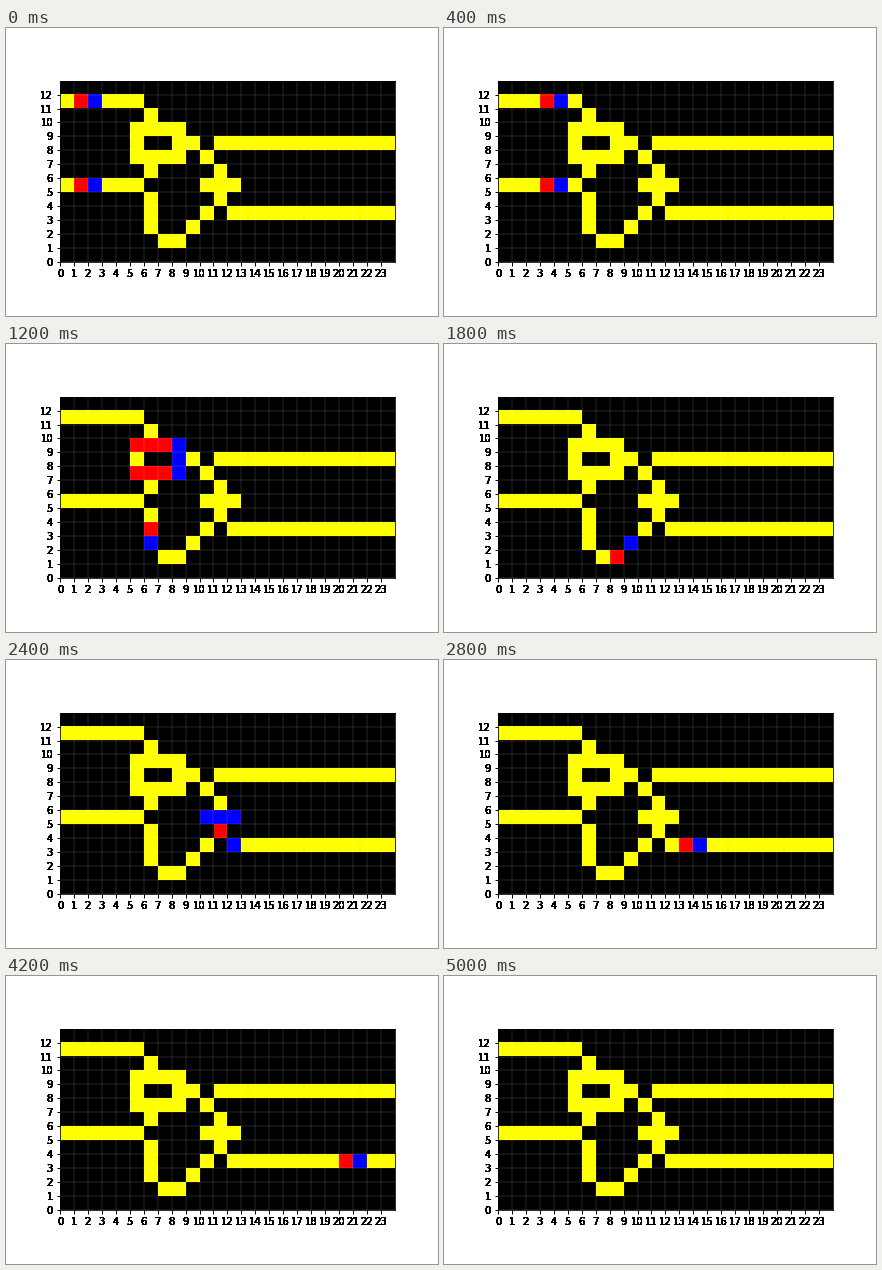
Recreate the animation shown at these times as a matplotlib script. Size 432x288 px, loop 8000 ms.

```python
import numpy as np
import matplotlib.pyplot as plt
from matplotlib.animation import FuncAnimation
from matplotlib.colors import ListedColormap

# Wireworld: two signals run into a logic gate
COLS, ROWS = 24, 13
EMPTY, WIRE, HEAD, TAIL = range(4)
STEP_MS, STEPS = 200, 40
LABEL_COPIES = 20  # stacked labels give the heavy look of repeated drawing
INPUT_ROWS = 5, 11

# Each wire is a path through corner cells (column, row)
WIRES = [
    [(0, 11), (5, 11), (6, 10)],                   # upper input
    [(0, 5), (5, 5), (6, 6)],                      # lower input
    [(5, 7), (8, 7), (8, 9), (5, 9), (5, 7)],      # ring
    [(6, 4), (6, 2), (7, 1), (8, 1), (11, 4),
     (11, 6), (9, 8)],                             # detour below the ring
    [(10, 5), (12, 5)],                            # cross bar
    [(11, 8), (23, 8)],                            # upper output
    [(12, 3), (23, 3)],                            # lower output
]


def lay_wire(grid, corners):
    for start, end in zip(corners, corners[1:]):
        count = np.abs(np.subtract(end, start)).max() + 1
        cols, rows = np.linspace(start, end, count).round().astype(int).T
        grid[rows, cols] = WIRE


def start_grid():
    grid = np.zeros((ROWS, COLS), dtype=int)
    for corners in WIRES:
        lay_wire(grid, corners)
    for row in INPUT_ROWS:
        grid[row, 1:3] = TAIL, HEAD
    return grid


def advance(grid):
    heads = np.pad((grid == HEAD).astype(int), 1)
    near = sum(heads[dy:dy + ROWS, dx:dx + COLS]
               for dy in range(3) for dx in range(3))
    new = grid.copy()
    new[grid == HEAD] = TAIL
    new[grid == TAIL] = WIRE
    new[(grid == WIRE) & ((near == 1) | (near == 2))] = HEAD
    return new


def label_axes(ax, pad=7):
    below, x_va, x_ha = ax.get_xaxis_text1_transform(pad)
    beside, y_va, y_ha = ax.get_yaxis_text1_transform(pad)
    for _ in range(LABEL_COPIES):
        for col in range(COLS):
            ax.text(col, 0, str(col), transform=below, va=x_va, ha=x_ha)
        for row in range(ROWS):
            ax.text(0, row, str(row), transform=beside, va=y_va, ha=y_ha)


states = [start_grid()]
while len(states) < STEPS:
    states.append(advance(states[-1]))

plt.rcParams.update({"font.family": "DejaVu Sans", "font.size": 10})
fig, ax = plt.subplots(figsize=(6, 4), dpi=72, facecolor="white")
fig.subplots_adjust(left=0.125, right=0.9, bottom=0.125, top=0.88)

image = ax.imshow(states[0], cmap=ListedColormap(["black", "yellow", "blue", "red"]),
                  vmin=EMPTY, vmax=TAIL, origin="lower",
                  extent=(0, COLS, 0, ROWS), interpolation="nearest")
ax.set(xticks=range(COLS), yticks=range(ROWS))
ax.tick_params(labelbottom=False, labelleft=False, width=1)
ax.grid(color="white", linestyle="-", linewidth=0.15)
label_axes(ax)


def update(step):
    image.set_data(states[step])
    return [image]


anim = FuncAnimation(fig, update, frames=STEPS, interval=STEP_MS,
                     repeat=True, repeat_delay=0)
plt.show()
```
